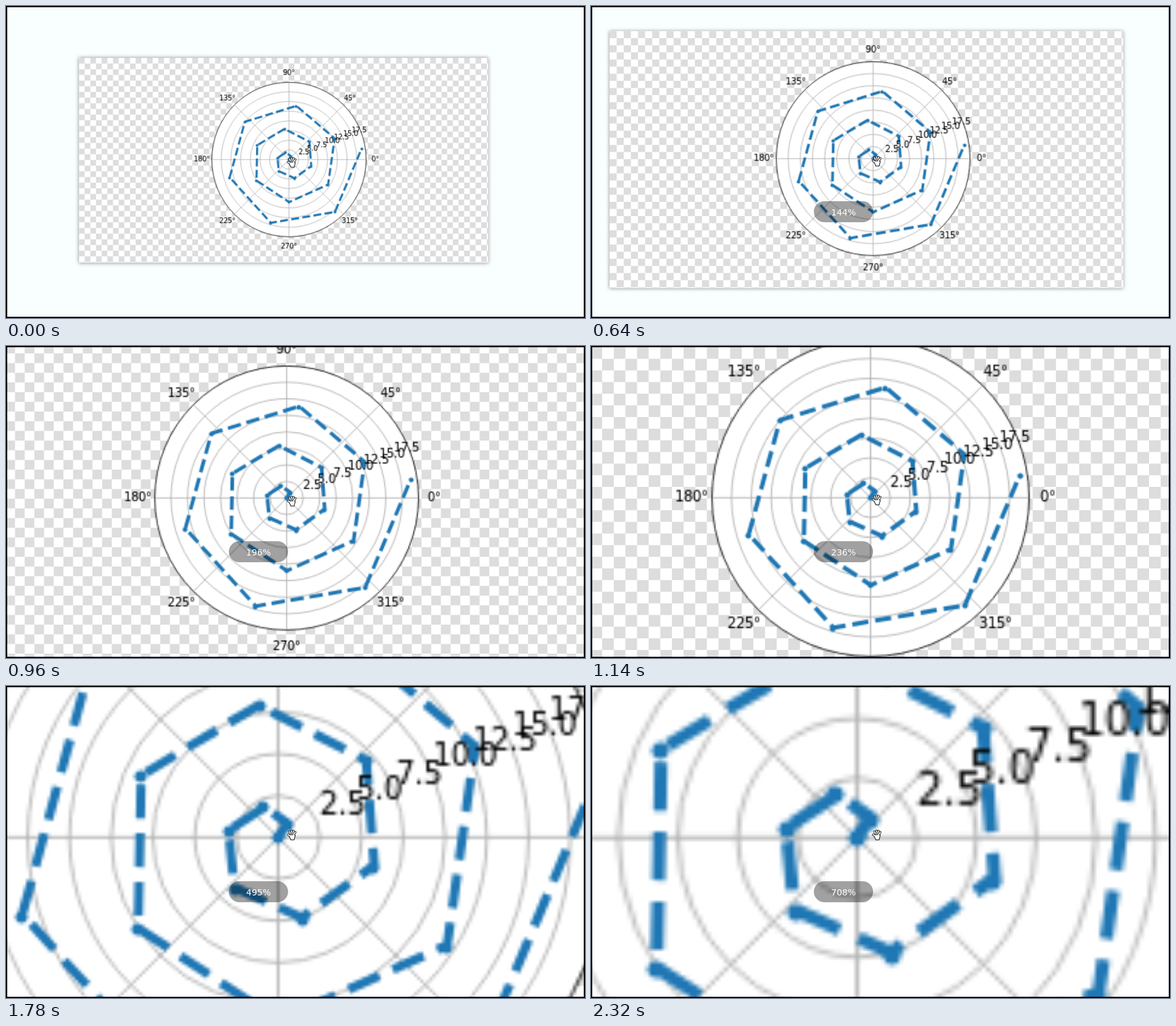
An HTML page with a canvas for the animation above (2380 ms loop, 938 by 505 pixels).

```html
<!DOCTYPE html>
<html lang="en">
<head>
<meta charset="utf-8">
<title>Polar plot zoom</title>
<style>
html, body { margin: 0; width: 100%; height: 100%; overflow: hidden; }
canvas { display: block; }
</style>
</head>
<body>
<canvas id="stage" width="938" height="505"></canvas>
<script>
const stage = document.getElementById('stage');
const ctx = stage.getContext('2d');
const LOOP = 2380, LAST_STEP = 15;
const TAU = Math.PI * 2;

// Unscaled image geometry
const IMG_W = 578, IMG_H = 289, CX = 296.5, CY = 143.4;
const RADIUS = 109, UNIT = RADIUS / 19.95, CELL = 8;

// Zoom percentages reached at a few steps
const ZOOM_KEYS = [[1, 114.7], [2, 118], [4, 144], [6, 196], [9, 346], [11, 495], [15, 708]];

const clamp = (v, lo, hi) => Math.min(Math.max(v, lo), hi);

function ease(step) {
  const u = (step - 1) / (LAST_STEP - 1);
  return u * u * (3 - 2 * u);
}

// Steps last 160 ms, one pauses 20 ms longer, the last comes early
function stepAt(t) {
  if (t >= 2320) return LAST_STEP;
  return Math.floor((t < 1140 ? Math.min(t, 1119) : t - 20) / 160);
}

function percentAt(step) {
  const s = Math.max(step, 1);
  const next = Math.max(1, ZOOM_KEYS.findIndex(key => key[0] >= s));
  const [s0, z0] = ZOOM_KEYS[next - 1], [s1, z1] = ZOOM_KEYS[next];
  const u = (ease(s) - ease(s0)) / (ease(s1) - ease(s0));
  return z0 * (z1 / z0) ** u;
}

function polar(r, angle) {
  return [CX + r * Math.cos(angle), CY - r * Math.sin(angle)];
}

function circle(g, x, y, r) {
  g.beginPath();
  g.arc(x, y, r, 0, TAU);
}

// Text set on whole pixels, glyph by glyph
function pixelText(g, text, x, y, centred) {
  const advances = [...text].map(c => Math.round(g.measureText(c).width));
  const width = advances.reduce((a, b) => a + b);
  let pen = centred ? Math.floor(x - width / 2) : Math.round(x);
  [...text].forEach((c, i) => {
    g.fillText(c, pen, y);
    pen += advances[i];
  });
}

function drawPlot() {
  const layer = document.createElement('canvas');
  layer.width = IMG_W;
  layer.height = IMG_H;
  const g = layer.getContext('2d');

  g.fillStyle = '#fff';
  circle(g, CX, CY, RADIUS);
  g.fill();

  g.strokeStyle = '#b0b0b0';
  g.lineWidth = 0.8;
  for (let i = 0; i < 8; i++) {
    g.beginPath();
    g.moveTo(CX, CY);
    g.lineTo(...polar(RADIUS, i * TAU / 8));
    g.stroke();
  }
  for (let r = 2.5; r < 19; r += 2.5) {
    circle(g, CX, CY, r * UNIT);
    g.stroke();
  }

  // Spiral: r = theta = 0..19, with dots on pixel centres
  const points = Array.from({ length: 20 }, (_, i) => polar(i * UNIT, i));
  g.strokeStyle = g.fillStyle = '#1f77b4';
  g.lineWidth = 3;
  g.lineJoin = 'round';
  g.setLineDash([11.1, 4.8]);
  g.beginPath();
  points.forEach(p => g.lineTo(...p));
  g.stroke();
  g.setLineDash([]);
  for (const [x, y] of points) {
    circle(g, Math.floor(x) + 0.5, Math.round(y) + 0.5, 2);
    g.fill();
  }

  g.strokeStyle = g.fillStyle = '#000';
  g.lineWidth = 0.8;
  circle(g, CX, CY, RADIUS);
  g.stroke();

  g.font = '10px "DejaVu Sans", sans-serif';
  for (let deg = 0; deg < 360; deg += 45) {
    const [x, y] = polar(122.9, deg * TAU / 360);
    pixelText(g, deg + '°', x, Math.floor(y + 3.55), true);
  }
  for (let r = 2.5; r < 19; r += 2.5) {
    const [x, y] = polar(r * UNIT, TAU / 16);
    pixelText(g, r.toFixed(1), x + 0.4, Math.round(y - 2.1), false);
  }
  return layer;
}

function drawImageBox(zoom, cx, cy) {
  ctx.save();
  ctx.translate(cx - CX * zoom, cy - CY * zoom);

  ctx.shadowColor = 'rgba(0,0,0,0.45)';
  ctx.shadowBlur = 6;
  ctx.fillStyle = '#fff';
  ctx.fillRect(0, 0, IMG_W * zoom, IMG_H * zoom);
  ctx.shadowColor = 'transparent';

  ctx.scale(zoom, zoom);
  ctx.fillStyle = '#ddd';
  for (let row = 0; row * CELL < IMG_H; row++) {
    const y = row * CELL;
    for (let x = row % 2 ? CELL : 0; x < IMG_W; x += 2 * CELL) {
      ctx.fillRect(x, y, Math.min(CELL, IMG_W - x), Math.min(CELL, IMG_H - y));
    }
  }
  ctx.drawImage(plot, 0, 0);
  ctx.restore();
}

function drawBadge(percent) {
  ctx.fillStyle = 'rgba(0,0,0,0.37)';
  ctx.beginPath();
  ctx.roundRect(361, 316, 96, 34, 17);
  ctx.fill();
  ctx.fillStyle = '#fff';
  ctx.font = '14px "DejaVu Sans", sans-serif';
  ctx.textAlign = 'center';
  ctx.fillText(Math.round(percent) + '%', 409, 339);
}

const FINGER_ANGLES = [-1.25, -0.52, -0.12, 0.26, 0.68];
const PALM = new Path2D('M5 9.5L13 9.5L12.5 12.5L11.5 15V16.5H6.5V15L4.5 12.5Z');

function drawHand(x, y) {
  ctx.save();
  ctx.translate(x, y);
  ctx.lineCap = ctx.lineJoin = 'round';
  ctx.strokeStyle = '#000';
  ctx.lineWidth = 2;
  ctx.stroke(PALM);
  for (const a of FINGER_ANGLES) {
    const length = 8.9 - 1.35 * a * a;
    for (const [color, width] of [['#000', 3.6], ['#fff', 1.9]]) {
      ctx.strokeStyle = color;
      ctx.lineWidth = width;
      ctx.beginPath();
      ctx.moveTo(8.5 + length * Math.sin(a), 11 - length * Math.cos(a));
      ctx.lineTo(8.5 + 3 * Math.sin(a), 11 - 2 * Math.cos(a));
      ctx.stroke();
    }
  }
  ctx.fillStyle = '#fff';
  ctx.fill(PALM);
  ctx.restore();
}

const plot = drawPlot();

function render(now) {
  const step = stepAt(now % LOOP);
  const percent = percentAt(step);
  const zoom = percent / 100;
  const cx = 463.7 - 4.63 * zoom;
  const cy = 248.5 - 0.5 * clamp(step - 1, 0, 8) + 0.17 * Math.max(step - 9, 0);
  const handY = 242 + (step ? 0 : 2) - 2 * clamp(step - 6, 0, 5);

  ctx.fillStyle = '#f9feff';
  ctx.fillRect(0, 0, 938, 505);
  drawImageBox(zoom, cx, cy);
  if (step > 1) drawBadge(percent);
  drawHand(455, handY);

  ctx.strokeStyle = '#000';
  ctx.lineWidth = 2;
  ctx.strokeRect(1, 1, 936, 503);
}

const origin = performance.now();
function tick() {
  render(performance.now() - origin);
  requestAnimationFrame(tick);
}
tick();
</script>
</body>
</html>
```
